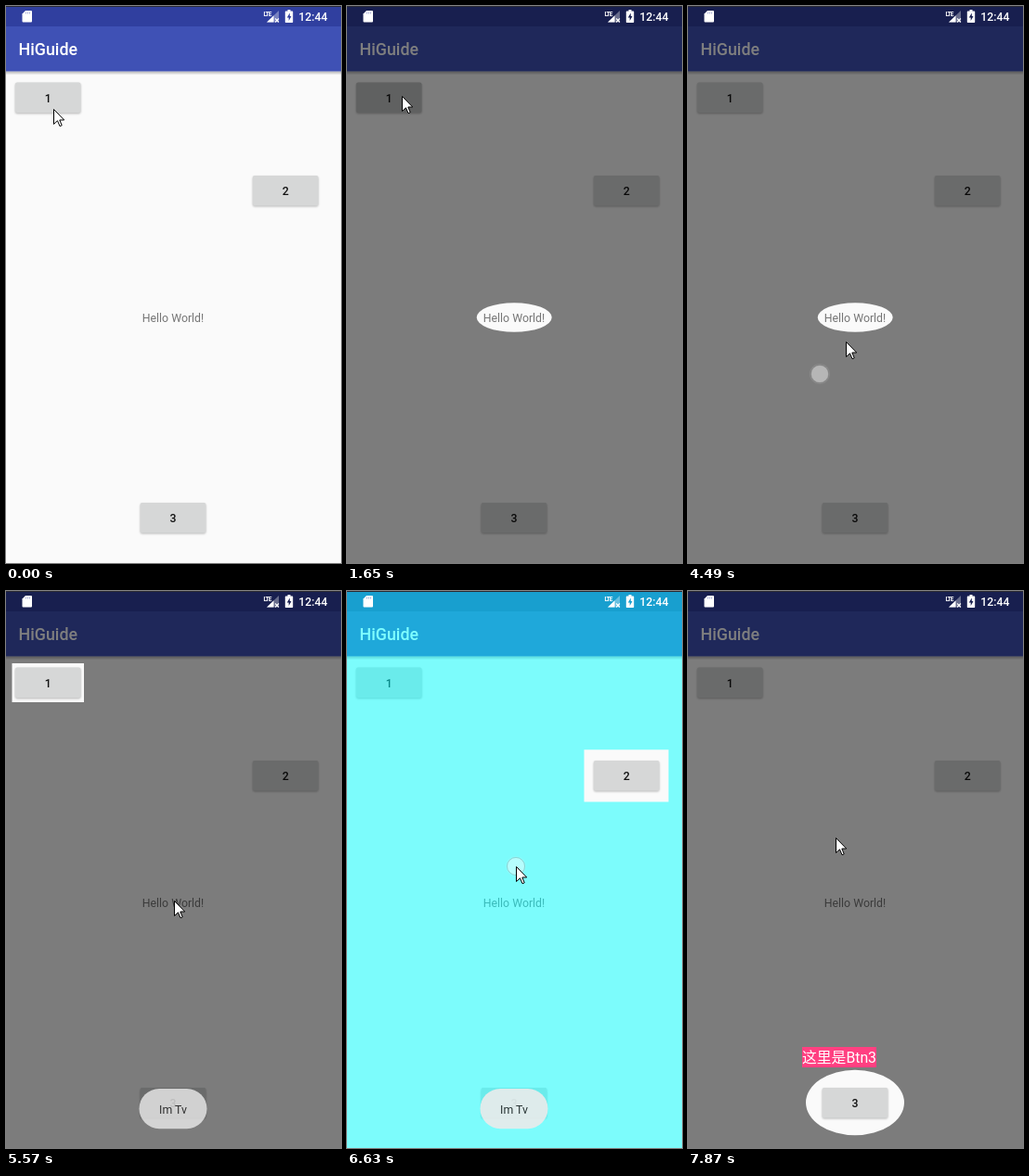
These frames come from a looping animation (361x601 px, 8 s). An HTML page:

```html
<!DOCTYPE html>
<html lang="en">
<head>
<meta charset="utf-8">
<title>HiGuide</title>
<style>
  html, body { margin: 0; width: 100%; height: 100%; overflow: hidden; background: #fafafa; }
  svg { display: block; width: 100%; height: 100%; }
  text { font-family: Roboto, "Noto Sans CJK SC", "Noto Sans CJK", sans-serif; font-size: 12.3px; }
  .mid { text-anchor: middle; }
  .bold { font-weight: 500; }
</style>
</head>
<body>
<svg viewBox="0 0 361 601" xmlns="http://www.w3.org/2000/svg">
  <defs>
    <linearGradient id="fade" x2="0" y2="1">
      <stop offset="0" stop-color="#000" stop-opacity=".28"/>
      <stop offset="1" stop-color="#000" stop-opacity="0"/>
    </linearGradient>
    <filter id="soft" x="-20%" y="-40%" width="140%" height="180%">
      <feGaussianBlur stdDeviation=".8"/>
    </filter>
  </defs>
  <rect width="361" height="601" fill="#fafafa"/>
  <rect y="70.500" width="361" height="4" fill="url(#fade)"/>
  <rect y="22" width="361" height="48.500" fill="#3f51b5"/>
  <rect width="361" height="22" fill="#303f9f"/>
  <text class="bold" x="13.500" y="53" style="font-size:17.85px" fill="#fff">HiGuide</text>
  <g id="buttons"></g>
  <text class="mid" x="180" y="341" fill="#757575">Hello World!</text>

  <path id="shade" fill-rule="evenodd" fill-opacity=".5"/>

  <g fill="#fff">
    <path d="M21 5H27a1 1 0 0 1 1 1V16.500a1 1 0 0 1-1 1H18.500a1 1 0 0 1-1-1V8.500Z"/>
    <path d="M21.500 6.500v2M23.500 6.500v2M25.500 6.500v2" stroke="#303f9f" stroke-opacity=".4"/>
    <text class="bold" x="277.500" y="11" style="font-size:6.500px;font-weight:700;letter-spacing:-.8px">LTE</text>
    <path d="M281 17.500H294V5Z" opacity=".35"/>
    <path d="M281 17.500H288.500V10.300Z"/>
    <path d="M290 13.500l4 4m0-4l-4 4" stroke="#fff" stroke-width="1.100"/>
    <path d="M303.500 4h3v1.500h2a.7 .7 0 0 1 .7 .7V17.300a.7 .7 0 0 1-.7 .7h-7a.7 .7 0 0 1-.7-.7V6.200a.7 .7 0 0 1 .7-.7h2Z"/>
    <path id="bolt" d="M305.800 7.500L302.800 12.500H304.700V16L307.500 11H305.800Z"/>
    <text class="bold" x="315.300" y="16">12:44</text>
  </g>
  <rect width="361" height="1" fill="#2b2b33"/>

  <g id="tip">
    <rect x="123" y="492" width="80" height="22" fill="#ff4081"/>
    <text x="123" y="509" style="font-size:15.8px" fill="#fff">这里是Btn3</text>
  </g>
  <g id="toast">
    <rect x="143.500" y="537" width="73" height="43.200" rx="21.600" fill="#ebebeb"/>
    <text class="mid" x="180" y="564" fill="#222">Im Tv</text>
  </g>
  <g id="touch" fill="#fff">
    <circle r="11" fill-opacity=".1"/>
    <circle r="9.500" fill-opacity=".38" stroke="#555" stroke-opacity=".25"/>
  </g>
  <path id="cursor" d="M.5 .5V16.500L4.500 12.800L7 18.700L9.200 17.800L6.800 12H11.700Z" fill="#fff" stroke="#000"/>
</svg>
<script>
const LOOP = 8000, TICK = 135, LEAD = 15;   // the screen updates once per tick
const $ = id => document.getElementById(id);

// Pointer key points: [tick, x, y]
const path = [
  [-1, 51, 111], [2, 78, 151], [5, 84, 138], [8, 59, 97], [13, 59, 97],
  [16, 194, 220], [18, 103, 394], [19, 66, 345], [21, 118, 300], [23, 152, 275],
  [24, 200, 264], [26, 256, 340], [28, 222, 381], [31, 142, 397], [32, 142, 397],
  [33, 170, 362], [35, 222, 330], [39, 181, 334], [41, 181, 334], [43, 203, 309],
  [46, 182, 297], [51, 182, 297], [55, 159, 266], [60, 159, 266]
];

const rect = (x, y, w, h) => `M${x} ${y}h${w}v${h}h${-w}Z`;
const oval = (x, y, rx, ry) =>
  `M${x - rx} ${y}a${rx} ${ry} 0 1 0 ${2 * rx} 0a${rx} ${ry} 0 1 0 ${-2 * rx} 0Z`;

// Guide pages; each opens on the release of a tap
const pages = [
  { at: 11, tint: "#000", bar: "#181f4f", hole: oval(180.2, 336, 40.5, 15.8) },
  { at: 40, tint: "#000", bar: "#181f4f", hole: rect(6.5, 78, 77.5, 42) },
  { at: 49, tint: "#0ff", bar: "#189fcf", hole: rect(255.5, 171.3, 91, 56.2) },
  { at: 57, tint: "#000", bar: "#181f4f", hole: oval(180, 552, 53, 35.3) }
];
const missedTap = 33;
const taps = [...pages.map(p => p.at), missedTap];

const button = (x, y, label) => `
  <rect x="${x}" y="${y + 1}" width="70.6" height="32.6" rx="2" opacity=".25" filter="url(#soft)"/>
  <rect class="face" x="${x}" y="${y}" width="70.6" height="32.5" rx="2" fill="#d6d7d7"/>
  <text class="mid bold" x="${x + 35.3}" y="${y + 21.4}" fill="#111">${label}</text>`;
$("buttons").innerHTML = button(9.9, 82.6, 1) + button(265.9, 182.9, 2) + button(144.7, 536, 3);
const face = document.querySelector(".face");

function pointer(k) {
  const i = path.findIndex(p => p[0] > k);
  const [a, x, y] = path[i - 1], [b, u, v] = path[i];
  const f = (k - a) / (b - a);
  return [Math.round(x + (u - x) * f), Math.round(y + (v - y) * f)];
}

const show = (el, on) => el.setAttribute("visibility", on ? "visible" : "hidden");
const move = (el, [x, y]) => el.setAttribute("transform", `translate(${x} ${y})`);

function draw(time) {
  const k = Math.floor((time - LEAD) / TICK);
  const page = pages.filter(p => k >= p.at).pop();
  show($("shade"), page);
  if (page) {
    $("shade").setAttribute("d", rect(0, 1, 361, 600) + page.hole);
    $("shade").setAttribute("fill", page.tint);
  }
  $("bolt").setAttribute("fill", page ? page.bar : "#303f9f");
  face.setAttribute("fill", k >= 9 && k < 14 ? "#c2c3c3" : "#d6d7d7");

  show($("tip"), page === pages[3]);
  const alpha = Math.min(.9, .4 * (k - 39), .4 * (56 - k));
  $("toast").setAttribute("opacity", Math.max(0, alpha));

  const tap = taps.find(n => k === n || k === n - 1);
  show($("touch"), tap);
  if (tap) move($("touch"), pointer(tap - 1));
  move($("cursor"), pointer(k));
}

const start = performance.now();
function tick() {
  draw((performance.now() - start) % LOOP);
  requestAnimationFrame(tick);
}
tick();
</script>
</body>
</html>
```
